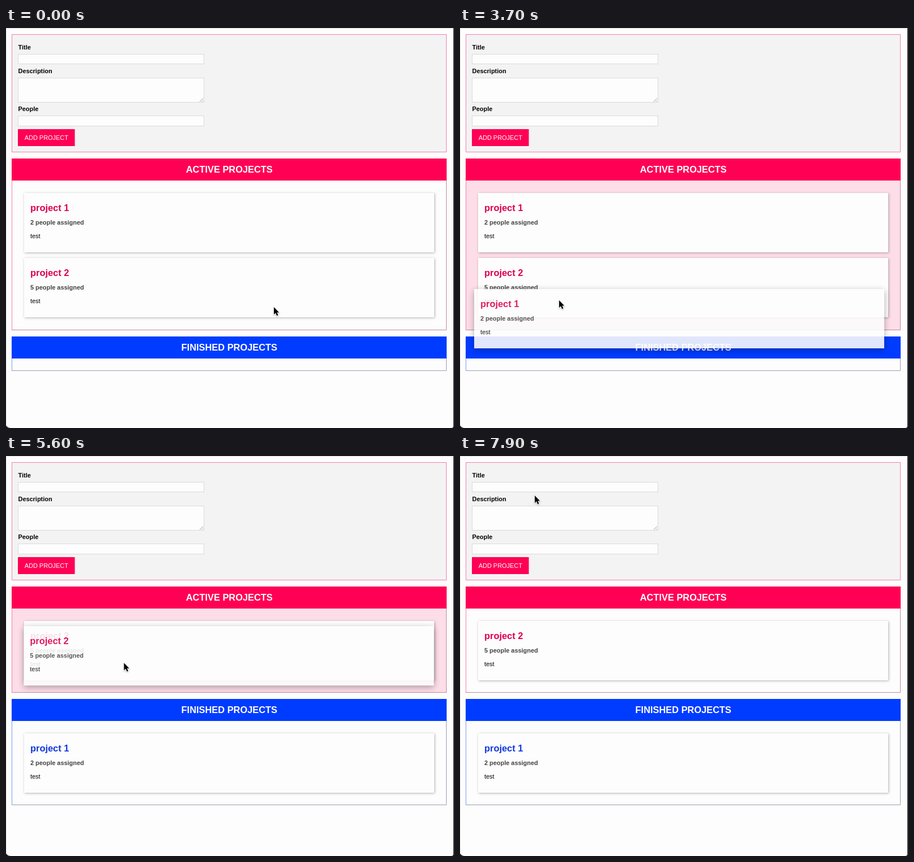
Write an HTML page that moves like this. It is 791 px wide and 708 px high and loops after 8000 ms.

```html
<!DOCTYPE html>
<html lang="en">
<head>
<meta charset="utf-8">
<title>Project board</title>
<style>
  html, body { margin: 0; width: 100%; height: 100%; overflow: hidden; background: #17191d; }
  svg { display: block; font: 10.93px "Liberation Sans", Arial, sans-serif; }
  .b { font-weight: bold; }
  .h { font-weight: bold; font-size: 16.4px; }
  .mid { text-anchor: middle; fill: #fff; }
  .field { fill: #fdfdfd; stroke: #dadada; }
  .card rect { fill: #fdfdfd; filter: drop-shadow(1px 1px 2px rgba(0, 0, 0, .3)); }
  .ghost { opacity: .885; }
  .ghost rect { filter: drop-shadow(0 3px 6px rgba(0, 0, 0, .36)); }
  #cursor { filter: drop-shadow(0 1px 1px rgba(0, 0, 0, .3)); }
</style>
</head>
<body>
<svg width="791" height="708" viewBox="0 0 791 708">
  <path d="M0 0H790V704Q790 708 786 708H9Q2 708 0 703Z" fill="#fdfdfd"/>
  <path d="M.5 703V.5H789.5V704" fill="none" stroke="#e2e2e2"/>
  <rect x="10.5" y="11.5" width="767" height="208" fill="#f3f3f3" stroke="#f57fb0"/>
  <g class="b">
    <text x="21.5" y="38">Title</text>
    <text x="21.5" y="80">Description</text>
    <text x="21.5" y="147">People</text>
  </g>
  <g class="field">
    <rect x="21.5" y="46.5" width="328" height="17"/>
    <rect x="21.5" y="88.5" width="328" height="43"/>
    <rect x="21.5" y="155.5" width="328" height="18"/>
  </g>
  <path d="M342 130.500L348 124.500M346 130.500L348 128.500" stroke="#777" stroke-width=".8"/>
  <rect x="21" y="179" width="100.500" height="30" fill="#ff0055"/>
  <text class="mid" x="71.300" y="198">ADD PROJECT</text>
  <g id="board"></g>
  <path id="cursor" d="M0 0V13L3 10.300 5.200 15.300 7.500 14.300 5.300 9.500H9.200Z"
        stroke="#fff" stroke-width="1.600" paint-order="stroke"/>
</svg>
<script>
const LOOP = 8000, STEP = 100, TOP = 231;
const board = document.getElementById('board');
const cursor = document.getElementById('cursor');

const lists = [
  { name: 'ACTIVE', main: '#ff0055', title: '#dd0050', line: '#f57fb0', edge: '#c188a3', over: '#fcdde8' },
  { name: 'FINISHED', main: '#003cff', title: '#1238dc', line: '#7f9df8', edge: '#9a9fae', over: '#d6e1fd' }
];
const people = { 1: 2, 2: 5 };

// Cards in each list from a given time on
const states = [
  [0, [[1, 2], []]],
  [4600, [[2], [1]]],
  [6200, [[], [1, 2]]],
  [7300, [[2], [1]]]
];
const drags = [
  { from: 3100, to: 4600, card: 1 },
  { from: 5500, to: 6200, card: 2 },
  { from: 6500, to: 7300, card: 2 }
];
const path = [
  [0, 473, 494], [900, 330, 320], [1800, 205, 130], [2400, 182, 66], [2700, 182, 66],
  [3100, 182, 312], [3700, 175, 482], [4200, 173, 597], [4600, 173, 597],
  [5300, 209, 357], [5500, 209, 357], [6200, 197, 523], [6500, 196, 523],
  [7100, 206, 287], [7300, 206, 287], [7900, 132, 70], [8000, 132, 70]
];

function cursorAt(t) {
  const i = path.findIndex(p => p[0] > t);
  const [t0, x0, y0] = path[i - 1], [t1, x1, y1] = path[i];
  const k = (t - t0) / (t1 - t0), e = k * k * (3 - 2 * k);
  return [x0 + (x1 - x0) * e, y0 + (y1 - y0) * e];
}

const listHeight = n => n ? 72 + 116 * n : 61;

function cardMarkup(id, x, y, color, cls = '') {
  return `<g class="card ${cls}" transform="translate(${x} ${y})">
    <rect width="724" height="105"/>
    <text class="h" x="11" y="32" fill="${color}">project ${id}</text>
    <text class="b" x="11" y="56" fill="#434343">${people[id]} people assigned</text>
    <text x="11" y="80">test</text></g>`;
}

function listMarkup(list, top, height, hot) {
  const bottom = top + height - .5;
  return `<rect x="10" y="${top}" width="768" height="${height}" fill="${hot ? list.over : '#fdfdfd'}"/>
    <path d="M10.5 ${top}V${bottom}" stroke="${list.line}"/>
    <path d="M10 ${bottom}H777.5V${top}" fill="none" stroke="${list.edge}"/>
    <rect x="10" y="${top}" width="768" height="39" fill="${list.main}"/>
    <text class="h mid" x="394.3" y="${top + 25}">${list.name} PROJECTS</text>`;
}

function draw(t) {
  const [x, y] = cursorAt(t);
  const content = states.filter(s => s[0] <= t).pop()[1];
  const drag = drags.find(d => t >= d.from && t < d.to);
  let top = TOP, out = '', ghost = '';
  lists.forEach((list, i) => {
    const height = listHeight(content[i].length);
    const hot = drag && y >= top && y < top + height;
    out += listMarkup(list, top, height, hot);
    content[i].forEach((id, j) => {
      const home = top + 61 + 115 * j;
      out += cardMarkup(id, 32, home, list.title);
      if (drag && drag.card === id) {
        const [gx, gy] = cursorAt(drag.from);
        ghost = cardMarkup(id, 32 + x - gx, home + y - gy, list.title, 'ghost');
      }
    });
    top += height + 11;
  });
  board.innerHTML = out + ghost;
  cursor.setAttribute('transform', `translate(${x} ${y})`);
}

const start = performance.now();
let shown = -1;
function tick() {
  const t = Math.floor((performance.now() - start) % LOOP / STEP) * STEP;
  if (t !== shown) draw(shown = t);
  requestAnimationFrame(tick);
}
tick();
</script>
</body>
</html>
```
